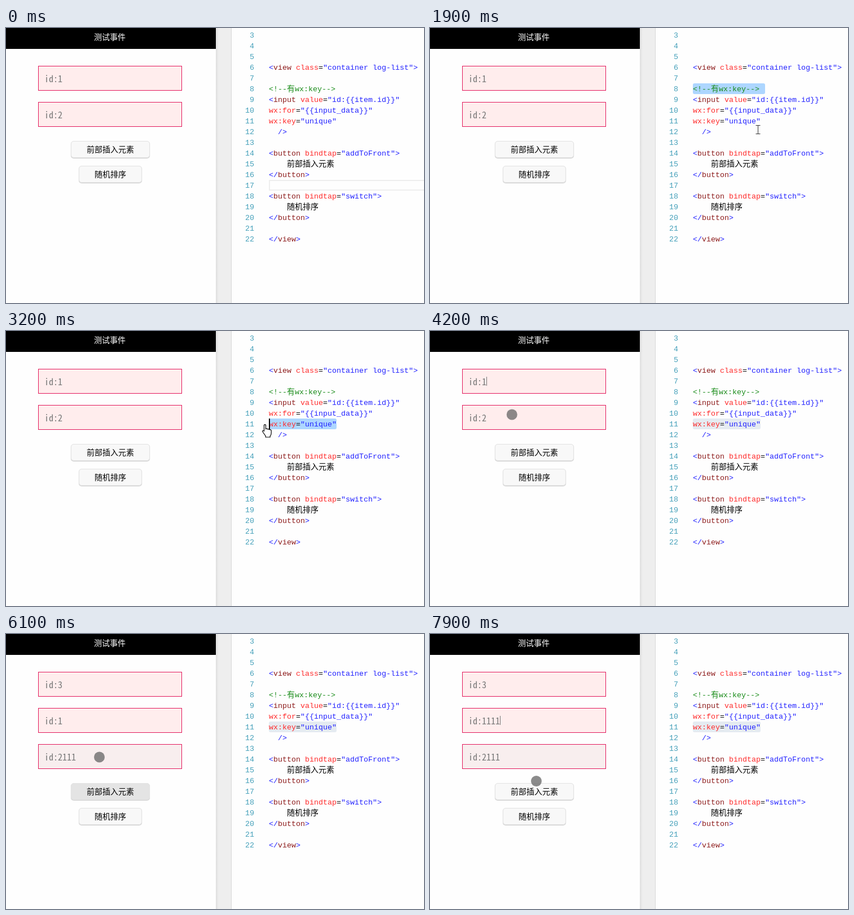
An HTML page that plays this animation: 741x487 px, repeating every 8000 ms.

```html
<!DOCTYPE html>
<html lang="zh">
<head>
<meta charset="utf-8">
<title>wx:key</title>
<style>
  html, body { margin: 0; width: 100%; height: 100%; overflow: hidden; background: #fefefe; }
  #stage { position: relative; width: 741px; height: 487px; overflow: hidden; }
  #stage > * { position: absolute; box-sizing: border-box; }
  .cjk, #title, .button { font: 14px/1 "Noto Sans CJK SC", "Noto Sans CJK", sans-serif; }
  #title { left: 0; top: 0; width: 372px; height: 37px; background: #000; color: #fff;
    line-height: 30px; padding-left: 156px; font-weight: 500; }
  #gap { left: 372px; top: 0; width: 28px; height: 487px; border-right: 1px solid #d9d9d9;
    background: linear-gradient(90deg, #dedede, #eee 5px); }
  .field { left: 57px; width: 255px; height: 44px; border: 1px solid #e2175a; background: #ffeded;
    padding-left: 10px; color: #777; font: 16px/42px "Noto Sans Mono CJK SC", monospace; white-space: pre; }
  #third { background: #f8eeee; }
  .button { height: 30px; line-height: 26px; text-align: center; color: #000; border-radius: 5px;
    border: 1px solid #e2e2e2; background: #f8f8f8; box-shadow: 0 1px 1px #ccc; }
  #front { left: 115px; width: 140px; }
  #shuffle { left: 129px; width: 112px; }
  pre { margin: 0; font: 13.333px/19px "Liberation Mono", monospace; }
  pre div { height: 19px; }
  #numbers { left: 400px; top: 4px; width: 40px; text-align: right; color: #45a0ba; }
  #code { left: 466px; top: 4px; color: #22f; }
  #code .cjk { line-height: 0; }
  .name { color: #8c1a1a; } .attr { color: #ff2a2a; } .note { color: #1a8c1a; } .plain { color: #000; }
  #row { left: 466px; width: 280px; height: 19px; border: 2px solid #eee; }
  #selection { height: 19px; border-radius: 3px; }
  #caret { width: 2px; height: 19px; background: #000; }
  #fieldCaret { width: 1px; height: 16px; background: #777; }
  #pointer { left: 0; top: 0; width: 1px; height: 1px; overflow: visible; }
</style>
</head>
<body>
<div id="stage">
  <div id="title">测试事件</div>
  <div id="gap"></div>
  <div class="field"></div>
  <div class="field"></div>
  <div class="field" id="third">id:2111</div>
  <div class="button" id="front">前部插入元素</div>
  <div class="button" id="shuffle">随机排序</div>
  <div id="row"></div>
  <div id="selection"></div>
  <pre id="numbers"></pre>
  <pre id="code"></pre>
  <div id="caret"></div>
  <div id="fieldCaret"></div>
  <svg id="pointer">
    <path id="beam" d="M-4-7.5h8M0-7.5v15M-4 7.5h8" fill="none" stroke="#333"/>
    <path id="hand" d="M-4.5-10.5q1.500-1.500 3 0v7l1-.5q2-.5 2.500 1 2-1 3 .8 2.500-.8 3.200 1.200v5q0 3-2 5v2h-8v-2l-4.500-6.500q-2-2.500-.2-3.200 1.200-.3 2 1.500z" fill="#fff" stroke="#000" stroke-width="1.2"/>
    <circle id="touch" r="9.5" fill="#646464" fill-opacity=".75"/>
  </svg>
</div>
<script>
const $ = id => document.getElementById(id);
const source = `


<view class="container log-list">

<!--有wx:key-->
<input value="id:{{item.id}}"
wx:for="{{input_data}}"
wx:key="unique"
  />

<button bindtap="addToFront">
    前部插入元素
</button>

<button bindtap="switch">
    随机排序
</button>

</view>`;

const span = (cls, text) => `<span class="${cls}">${text}</span>`;
const escapeHtml = s => s.replace(/</g, '&lt;').replace(/>/g, '&gt;');
function highlight(line) {
  return line.replace(/(<!--.*-->)|"[^"]*"|([\w:]+)(?==)|([a-z]+)|(=)|[<>]|([\u4e00-\u9fff]+)/g,
    (all, note, attr, name, equals, text) =>
      note ? span('note', escapeHtml(note).replace(/[\u4e00-\u9fff]+/, s => span('cjk', s))) :
      attr ? span('attr', attr) :
      name ? span('name', name) :
      equals ? span('plain', equals) :
      text ? span('cjk plain', text) : escapeHtml(all));
}
const lines = source.split('\n');
$('code').innerHTML = lines.map(l => `<div>${highlight(l)}</div>`).join('');
$('numbers').innerHTML = lines.map((_, i) => `<div>${i + 3}</div>`).join('');

const clamp = (v, low, high) => Math.min(high, Math.max(low, v));
const easeOut = k => 1 - (1 - k) ** 2;

const home = { x: 728, y: 75 };
const moves = [
  { from: 100, to: 600, x: 533, y: 106 },
  { from: 1200, to: 1700, x: 562, y: 222 },
  { from: 1700, to: 2100, x: 588, y: 166 },
  { from: 2200, to: 2900, x: 462, y: 177 },
  { from: 3200, to: 3700, x: 164, y: 100 },
  { from: 4000, to: 4400, x: 139, y: 164 },
  { from: 5400, to: 5900, x: 165.5, y: 218 },
  { from: 6300, to: 6800, x: 135, y: 161 },
  { from: 7600, to: 7900, x: 188.5, y: 260.5 }
];
function pointerAt(t) {
  return moves.reduce((p, m) => {
    const k = easeOut(clamp((t - m.from) / (m.to - m.from), 0, 1));
    return { x: p.x + (m.x - p.x) * k, y: p.y + (m.y - p.y) * k };
  }, home);
}

const charWidth = 8, codeLeft = 466, valueEnd = 586;
const lineTop = n => 3 + (n - 3) * 19;
const fieldTop = i => 67 + i * 64;
const typed = (t, start, pause) => '1'.repeat(clamp(Math.floor((t - start) / pause) + 1, 0, 3));

// The drag selects whole characters, one step behind the pointer
function dragEdge(t) {
  const column = Math.round((pointerAt(t - 100).x - codeLeft) / charWidth);
  return clamp(codeLeft + column * charWidth, codeLeft, valueEnd);
}

const place = (el, box) => {
  for (const side in box) el.style[side] = box[side] + 'px';
};
const show = (el, on) => { el.style.visibility = on ? 'visible' : 'hidden'; };
const fields = document.querySelectorAll('.field');
fields.forEach((f, i) => place(f, { top: fieldTop(i) }));
place($('row'), { top: lineTop(17) });

function renderPhone(t) {
  const added = t >= 6100;
  const second = added ? 'id:1' + typed(t, 7400, 100) : 'id:2' + typed(t, 4900, 250);
  fields[0].textContent = added ? 'id:3' : 'id:1';
  fields[1].textContent = second;
  show(fields[2], added);

  const count = added ? 3 : 2;
  place($('front'), { top: fieldTop(count) + 5 });
  place($('shuffle'), { top: fieldTop(count) + 49 });
  $('front').style.background = t === 6100 ? '#e4e4e4' : '#f8f8f8';

  const inFirst = t >= 4100 && t < 4400;
  const inSecond = t >= 4600 && t < 5900 || t >= 7000;
  const text = inFirst ? 'id:1' : second;
  show($('fieldCaret'), inFirst || inSecond);
  place($('fieldCaret'), { left: 68 + charWidth * text.length, top: fieldTop(inFirst ? 0 : 1) + 14 });
}

function renderEditor(t) {
  const dragging = t >= 2100, blurred = t >= 3900;
  const left = dragging ? dragEdge(t) : codeLeft;
  const right = dragging ? valueEnd : valueEnd + charWidth;
  show($('row'), t < 800);
  show($('selection'), t >= 1100);
  place($('selection'), { left, width: right - left, top: lineTop(dragging ? 11 : 8) });
  $('selection').style.background = blurred ? '#e5ebf1' : '#add6ff';
  show($('caret'), t >= 1100 && t < 1600 || dragging && !blurred);
  place($('caret'), { left, top: lineTop(dragging ? 11 : 9) });
}

function renderPointer(t) {
  const { x, y } = pointerAt(t);
  const shape = t < 100 ? '' : x > 474 ? 'beam' : x > 372 ? 'hand' : 'touch';
  for (const id of ['beam', 'hand', 'touch']) {
    show($(id), id === shape);
    $(id).setAttribute('transform', `translate(${x} ${y})`);
  }
}

const start = performance.now();
function tick() {
  const t = Math.floor((performance.now() - start) % 8000 / 100) * 100;
  renderPhone(t);
  renderEditor(t);
  renderPointer(t);
  requestAnimationFrame(tick);
}
tick();
</script>
</body>
</html>
```
